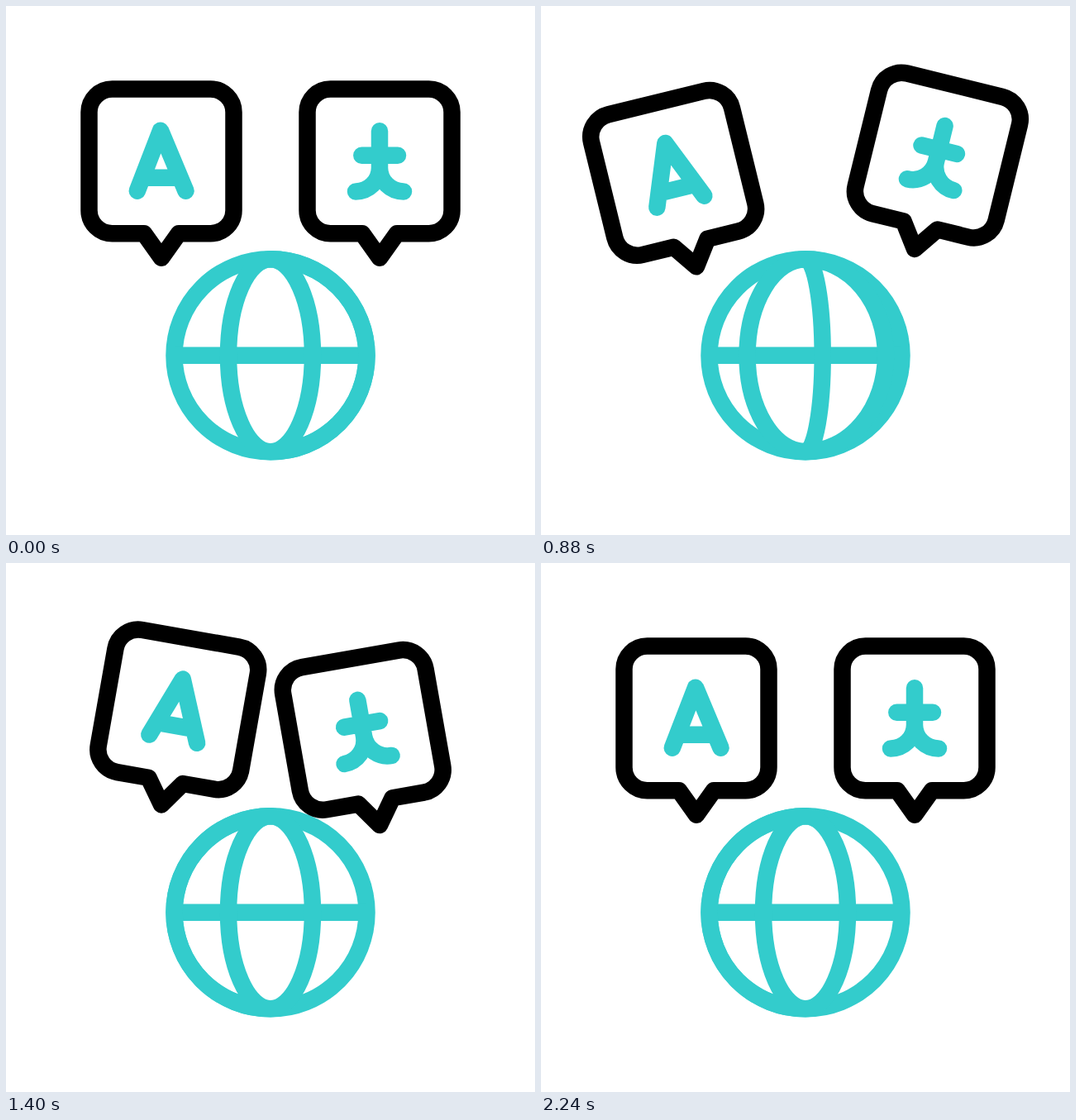
An HTML page for the animation above (2400 ms loop, 640 by 640 pixels).

```html
<!DOCTYPE html>
<html lang="en">
<head>
<meta charset="utf-8">
<title>Translation</title>
<style>
  html, body { margin: 0; width: 100%; height: 100%; overflow: hidden; background: #fff; }
  svg { display: block; width: 100%; height: 100%; fill: none; stroke-width: 20.5; stroke-linecap: round; stroke-linejoin: round; }
  .teal { stroke: #3cc; }
</style>
</head>
<body>
<svg viewBox="0 0 640 640">
  <defs>
    <!-- Speech bubble with the centre of its tip at 0,0 -->
    <path id="bubble" stroke="#000" d="M-59.5-204.2H59.5a28 28 0 0 1 28 28V-57.5a28 28 0 0 1-28 28H21L0 0-21-29.5H-59.5a28 28 0 0 1-28-28V-176.2a28 28 0 0 1 28-28z"/>
  </defs>
  <g class="teal" stroke-linecap="butt">
    <circle cx="320" cy="422.8" r="116.5"/>
    <path d="M204 422.8H436"/>
    <path id="meridians" style="stroke-linecap:butt"/>
  </g>
  <g id="left">
    <use href="#bubble"/>
    <path class="teal" d="M-29.2-81 -1-154 29.5-81M-20-97H20"/>
  </g>
  <g id="right">
    <use href="#bubble"/>
    <path class="teal" d="M0-153.5V-109A29 29 0 0 1-29-80.2M0-109A29 29 0 0 0 29-80.2M-21.7-124H22"/>
  </g>
</svg>
<script>
const LOOP = 2400, STEP = 20;
const R = 116.5, REST = 51;

// Keys are [step, value] pairs
const tilt = [[10, 0], [40, 15], [70, -10], [90, 4.2], [112, 0]];
const lift = [[10, 0], [35, 26], [60, -26], [85, 13], [112, 0]];
const spin = [[31, 0], [67, 1]];

const mix = (a, b, s) => a + (b - a) * s;

function valueAt(keys, n) {
  if (n <= keys[0][0]) return keys[0][1];
  for (let i = 1; i < keys.length; i++) {
    const [n0, a] = keys[i - 1], [n1, b] = keys[i];
    if (n < n1) {
      const u = (n - n0) / (n1 - n0);
      return mix(a, b, u * u * (3 - 2 * u));
    }
  }
  return keys[keys.length - 1][1];
}

const byId = id => document.getElementById(id);
const left = byId('left'), right = byId('right'), meridians = byId('meridians');

const place = (el, x, dy, angle) =>
  el.setAttribute('transform', `translate(${x} ${304.7 + dy}) rotate(${angle})`);

const meridian = x =>
  `M320 ${422.8 - R}A${Math.abs(x)} ${R} 0 0 ${x > 0 ? 1 : 0} 320 ${422.8 + R}`;

function draw(now) {
  const n = Math.floor(now % LOOP / STEP);
  const angle = valueAt(tilt, n), dy = valueAt(lift, n);
  place(left, 188, dy, -angle);
  place(right, 452, -dy, angle);

  const s = valueAt(spin, n);
  meridians.setAttribute('d',
    [mix(-REST, -R, s), mix(REST, -REST, s), mix(R, REST, s)].map(meridian).join(''));
}

const start = performance.now();
function frame() {
  draw(performance.now() - start);
  requestAnimationFrame(frame);
}
frame();
</script>
</body>
</html>
```
